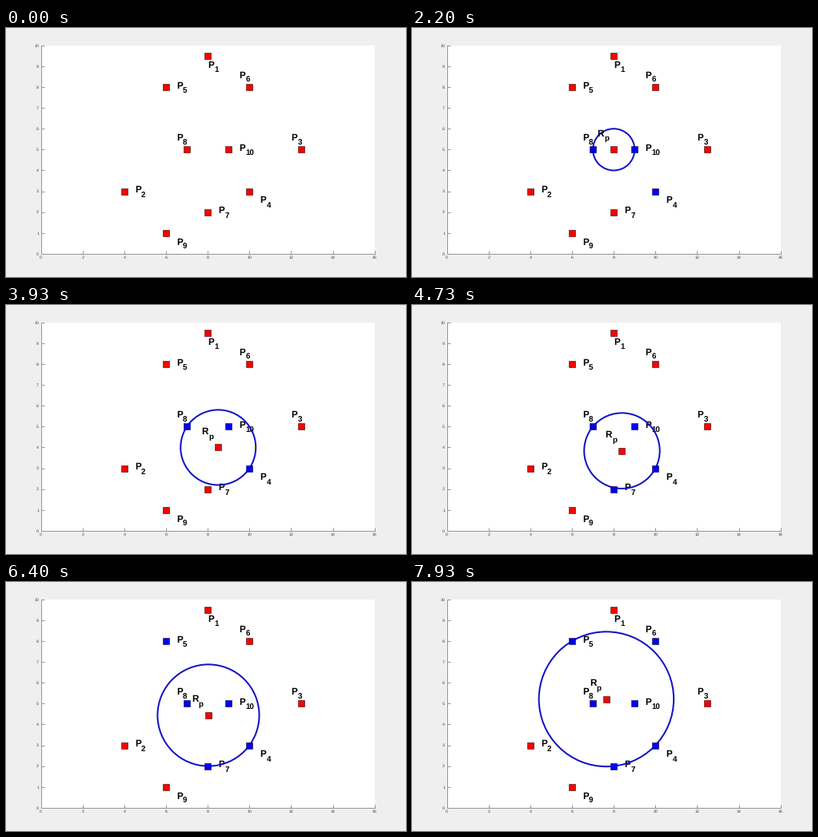
Write a matplotlib script that moves like this. It is 500 px wide and 312 px high and loops after 8 s.

```python
import matplotlib.pyplot as plt
import numpy as np
from matplotlib.animation import FuncAnimation
from matplotlib.patches import Circle

W, H, DPI = 500, 312, 100
FRAMES, LOOP = 120, 8000
PT = 72 / DPI  # points per pixel
EM, SUB = 11.6, 9.8  # label sizes in pixels
RED, BLUE, RING, GREY = "#ff0000", "#0000ff", "#1212c6", "#969696"

P = dict(enumerate(np.array([
    (8, 9.5), (4, 3), (12.5, 5), (10, 3), (6, 8),
    (10, 8), (8, 2), (7, 5), (6, 1), (9, 5)]), 1))
ABOVE, BELOW = (3, 6, 8), (1, 4, 9)  # label sides; the others sit level

START, PAUSE = 8, 8
JOIN = {8: START, 10: START, 4: 25, 7: 59, 5: 72, 6: 116}  # point turns blue


def midpoint(a, b):
    return (a + b) / 2


def circumcentre(a, b, c):
    m = 2 * np.array([b - a, c - a])
    return np.linalg.solve(m, [b @ b - a @ a, c @ c - a @ a])


def bisector_hit(a, b, c):
    """Where the bisector of ab meets the segment ac."""
    u = b - a
    return a + (c - a) * (u @ u / 2) / (u @ (c - a))


# The centre of the smallest circle slides to take in each new point.
c0 = midpoint(P[8], P[10])
c1 = midpoint(P[8], P[4])
c2 = circumcentre(P[8], P[4], P[7])
c3 = circumcentre(P[4], P[7], P[5])
joins = [JOIN[n] for n in (4, 7, 5, 6)]
paths = [[c0, bisector_hit(P[8], P[10], P[4]), c1], [c1, c2], [c2, c3]]
MOVES = [(a + PAUSE, b - 1, path, P[rim])
         for a, b, path, rim in zip(joins, joins[1:], paths, (8, 8, 4))]

plt.rcParams["text.hinting"] = "none"
plt.rcParams["font.family"] = "Liberation Sans"
fig = plt.figure(figsize=(W / DPI, H / DPI), dpi=DPI, facecolor="#efefef")
L, R, T, B = 43.75, 460.65, 21.8, 282.9
ax = fig.add_axes([L / W, 1 - B / H, (R - L) / W, (B - T) / H])
ax.set(xlim=(0, 16), ylim=(0, 10), xticks=range(0, 17, 2), yticks=range(11))
ax.spines[["top", "right"]].set_visible(False)
ax.spines[["left", "bottom"]].set(linewidth=PT, color=GREY)
ax.tick_params(direction="in", length=4 * PT, width=PT, pad=2.6 * PT,
               color=GREY, labelcolor="#404040", labelsize=5.3 * PT)


def marker(x, y, z=4):
    return ax.plot([x], [y], "s", ms=7.5 * PT, mfc=RED, mec="black",
                   mew=0.5 * PT, zorder=z, snap=False)[0]


def label(letter, sub, advance, z):
    """Bold letter with a subscript; both share one data anchor."""
    def part(text, size, dx, dy):
        return ax.annotate(text, (0, 0), xytext=(dx * PT, dy * PT),
                           textcoords="offset points", fontsize=size * PT,
                           weight="bold", va="baseline", ha="left", zorder=z)
    return part(letter, EM, 0, -1.7), part(sub, SUB, advance * EM + 0.3, -7.3)


def place(parts, x, y):
    for part in parts:
        part.xy = (x, y)


marks = {}
for n, (x, y) in P.items():
    marks[n] = marker(x, y)
    dx = 0 if n == 1 else -0.5 if n in ABOVE else 0.5
    dy = 0.5 * ((n in ABOVE) - (n in BELOW))
    place(label("P", str(n), 0.667, 2), x + dx, y + dy)

ring = ax.add_patch(Circle(c0, 1, fill=False, ec=RING, lw=2 * PT, zorder=3))
centre = marker(*c0, 6)
tag = label("R", "p", 0.722, 5)


def along(path, u):
    """Point at share u of the length of a polyline."""
    path = np.array(path)
    s = np.r_[0, np.cumsum(np.hypot(*np.diff(path, axis=0).T))]
    return np.array([np.interp(u * s[-1], s, col) for col in path.T])


def pose(i):
    begun = [m for m in MOVES if m[0] <= i] or MOVES[:1]
    start, end, path, rim = begun[-1]
    c = along(path, np.clip((i - start) / (end - start), 0, 1))
    return c, np.hypot(*(rim - c))


def draw(i):
    for n, mark in marks.items():
        mark.set_markerfacecolor(BLUE if i >= JOIN.get(n, FRAMES) else RED)
    (x, y), r = pose(i)
    ring.set(center=(x, y), radius=r)
    centre.set_data([x], [y])
    place(tag, x - 0.8, y + 0.7)
    for part in (ring, centre, *tag):
        part.set_visible(i >= START)
    return [*marks.values(), ring, centre, *tag]


anim = FuncAnimation(fig, draw, frames=FRAMES, interval=LOOP / FRAMES,
                     repeat=True, repeat_delay=0, blit=False)
plt.show()
```
